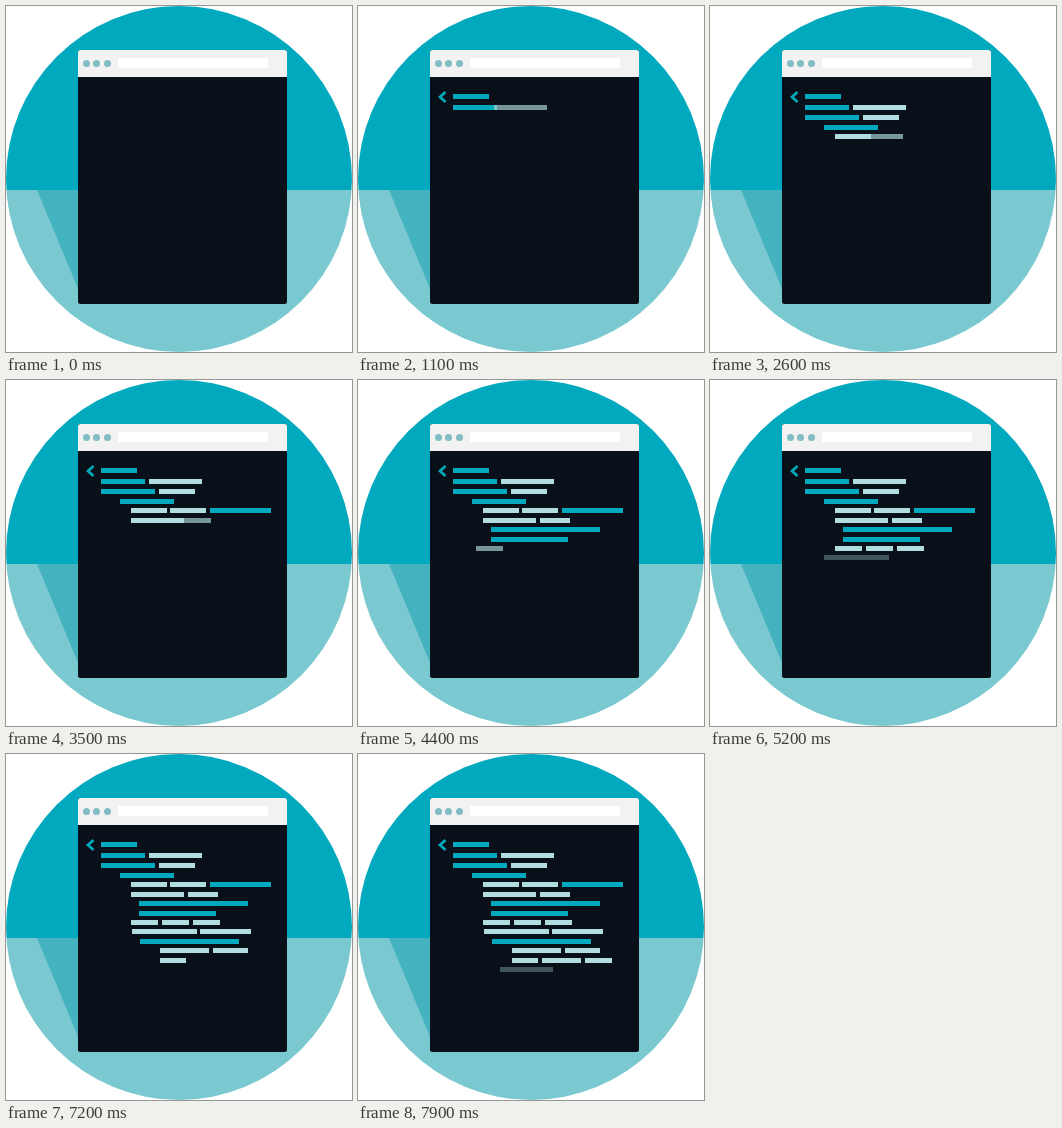
These frames come from a looping animation (346 by 346 pixels, 8000 ms). An HTML page:

```html
<!DOCTYPE html>
<html lang="en">
<head>
<meta charset="utf-8">
<title>Code window</title>
<style>
  html, body { margin: 0; width: 100%; height: 100%; overflow: hidden; background: #fff; }
  svg { display: block; width: 100vw; height: 100vh; }
</style>
</head>
<body>
<svg viewBox="0 0 346 346">
  <clipPath id="disc"><circle cx="173" cy="173" r="173"/></clipPath>
  <g clip-path="url(#disc)">
    <rect width="346" height="184" fill="#00a9bd"/>
    <rect y="184" width="346" height="162" fill="#7bc9d0"/>
    <path d="M31 184H73V285Z" fill="#45b2c0"/>
  </g>
  <rect x="72" y="44" width="209" height="254" rx="2.5" fill="#09101a"/>
  <path d="M72 71V46.500a2.500 2.500 0 0 1 2.500-2.500H278.500a2.500 2.500 0 0 1 2.500 2.500V71Z" fill="#f2f2f2"/>
  <g fill="#82bcc4">
    <circle cx="80.500" cy="57.500" r="3.500"/>
    <circle cx="90.500" cy="57.500" r="3.500"/>
    <circle cx="101.500" cy="57.500" r="3.500"/>
  </g>
  <rect x="112" y="52" width="150" height="10" fill="#fff"/>
  <g id="code">
    <path d="M87.500 86L82 91L87.500 96" fill="none" stroke="#00a9bd" stroke-width="2.800" opacity="0"/>
  </g>
</svg>
<script>
const LOOP = 8000, FRAME = 100, GAP = 300;
const TEAL = '#00a9bd', PALE = '#b1dce0';

// Each row: top, then bars as [left, right, colour]
const rows = [
  [88, [95, 131, TEAL]],
  [99, [95, 139, TEAL], [143, 196, PALE]],
  [109, [95, 149, TEAL], [153, 189, PALE]],
  [119, [114, 168, TEAL]],
  [128, [125, 161, PALE], [164, 200, PALE], [204, 265, TEAL]],
  [138, [125, 178, PALE], [182, 212, PALE]],
  [147, [133, 242, TEAL]],
  [157, [133, 210, TEAL]],
  [166, [125, 152, PALE], [156, 183, PALE], [187, 214, PALE]],
  [175, [126, 191, PALE], [194, 245, PALE]],
  [185, [134, 210, TEAL], [206, 233, TEAL]],
  [194, [154, 203, PALE], [207, 242, PALE]],
  [204, [154, 180, PALE], [184, 223, PALE], [227, 254, PALE]],
  [213, [154, 207, PALE]]
];

// Entrance poses, one per frame: [opacity, x shift]
const poses = [[0, 0], [0.33, -12], [0.66, -7], [1, 0]];

const code = document.getElementById('code');
for (const [y, ...bars] of rows) {
  for (const [left, right, fill] of bars) {
    const bar = document.createElementNS('http://www.w3.org/2000/svg', 'rect');
    const attrs = { x: left, y, width: right - left, height: 5, fill, opacity: 0 };
    for (const name in attrs) bar.setAttribute(name, attrs[name]);
    code.append(bar);
  }
}
const parts = [...code.children];

function draw(time) {
  const t = Math.floor((time % LOOP) / FRAME) * FRAME;
  parts.forEach((part, i) => {
    const step = Math.floor((t - i * GAP) / FRAME);
    const [alpha, dx] = poses[Math.max(0, Math.min(3, step))];
    part.setAttribute('opacity', alpha);
    part.setAttribute('transform', `translate(${dx} 0)`);
  });
}

const start = performance.now();
function tick() {
  draw(performance.now() - start);
  requestAnimationFrame(tick);
}
draw(0);
requestAnimationFrame(tick);
</script>
</body>
</html>
```
